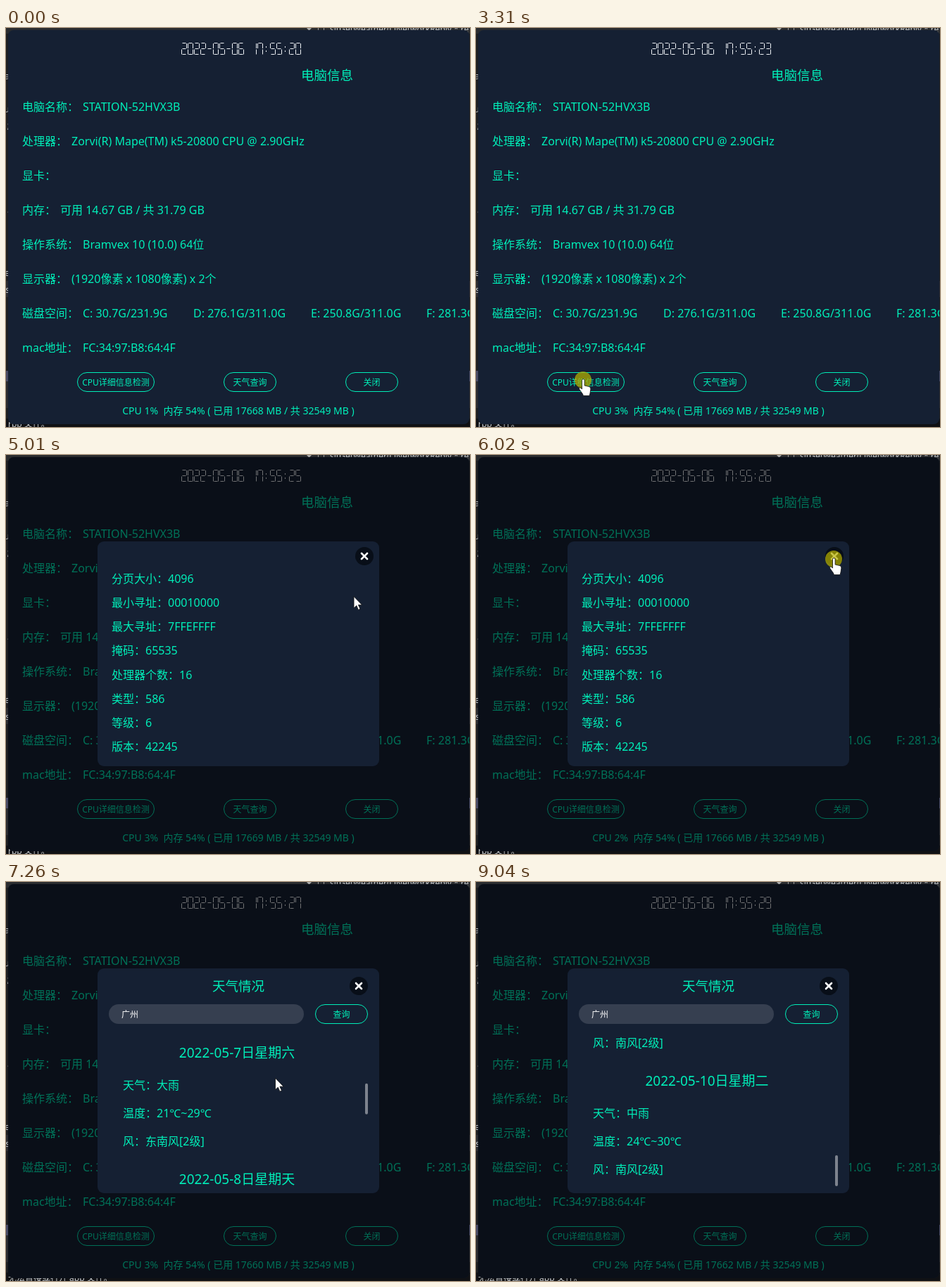
An HTML page that plays this animation: 659x568 px, repeating every 9420 ms.

```html
<!DOCTYPE html>
<html lang="zh-CN">
<head>
<meta charset="utf-8">
<title>电脑信息</title>
<style>
html, body { margin: 0; width: 659px; height: 568px; overflow: hidden; background: #1e1f21; }
svg { display: block; }
text { font-family: "Noto Sans", "Noto Sans CJK SC", "Noto Sans CJK", sans-serif; font-size: 16px; fill: #00efb9; white-space: pre; }
.mid { text-anchor: middle; }
.big { font-size: 18.5px; }
.small { font-size: 12px; }
.status { font-size: 14px; }
.code { font-size: 12px; fill: #c4c8cc; }
.pill { fill: none; stroke: #00efb9; }
</style>
</head>
<body>
<svg id="stage" width="659" height="568" viewBox="0 0 659 568">
  <defs>
    <clipPath id="frame"><rect x="3" y="3" width="655" height="561" rx="8"/></clipPath>
    <clipPath id="view"><rect x="146" y="213" width="372" height="220"/></clipPath>
  </defs>
  <g id="desk"></g>
  <g clip-path="url(#frame)">
    <rect width="659" height="568" fill="#152033"/>
    <g id="main"></g>
    <rect id="dim" width="659" height="568" fill="#000" opacity=".53"/>
    <g id="cpu"></g>
    <g id="weather"></g>
  </g>
  <circle id="press" r="12" fill="#b5b000" opacity=".72"/>
  <path id="cursor" fill="#fff" stroke="#101010" stroke-width=".8" stroke-linejoin="round"/>
</svg>
<script>
const LOOP = 9420;
const $ = id => document.getElementById(id);

function add(parent, tag, attrs, content) {
  const el = document.createElementNS('http://www.w3.org/2000/svg', tag);
  for (const k in attrs) el.setAttribute(k, attrs[k]);
  if (content !== undefined) el.textContent = content;
  parent.appendChild(el);
  return el;
}
const label = (g, x, y, s, cls = '') => add(g, 'text', { x, y, class: cls }, s);
const box = (g, x, y, width, height, fill, rx = 0) =>
  add(g, 'rect', { x, y, width, height, fill, rx });

function pill(g, x, y, w, s) {
  add(g, 'rect', { x: x + .5, y: y + .5, width: w - 1, height: 27, rx: 13.5, class: 'pill' });
  label(g, x + w / 2, y + 18.5, s, 'mid small');
}
function closer(g, x, y) {
  add(g, 'circle', { cx: x, cy: y, r: 13, fill: '#080e18' });
  add(g, 'path', { d: `M${x - 4} ${y - 4}l8 8m0-8l-8 8`, stroke: '#fff', 'stroke-width': 2.6, 'stroke-linecap': 'round' });
}

// Desktop behind the window
const desk = $('desk');
box(desk, 0, 0, 659, 568, '#1e1f21');
box(desk, 0, 0, 659, 8, '#2a2c2f');
box(desk, 0, 360, 659, 23, '#2b2c30');
box(desk, 0, 488, 659, 15, '#484a64');
box(desk, 0, 503, 659, 38, '#2a2b2f');
box(desk, 0, 556, 659, 12, '#101114');
add(desk, 'path', { d: 'M427 0h7l-3.5 4z', fill: '#aaa' });
add(desk, 'rect', { x: 443.5, y: -4.5, width: 8, height: 9, fill: 'none', stroke: '#999' });
label(desk, 460, 6, 'sitGetWeather(QNetworkReply * re', 'code');
[[73, 'a'], [120, 'u'], [143, ';'], [263, '.'], [330, 'i'], [353, 'e'], [377, 's']]
  .forEach(([y, s]) => add(desk, 'text', { x: 5, y, class: 'code', 'text-anchor': 'end' }, s));
const note = label(desk, 3, 568, '', 'code');

// Main panel
const main = $('main');
const clock = add(main, 'path', { fill: 'none', stroke: '#eef2f6', 'stroke-width': 1 });
label(main, 456, 74, '电脑信息', 'mid big');
[
  ['电脑名称：', [109, 'STATION-52HVX3B']],
  ['处理器：', [93, 'Zorvi(R) Mape(TM) k5-20800 CPU @ 2.90GHz']],
  ['显卡：'],
  ['内存：', [77, '可用 14.67 GB / 共 31.79 GB']],
  ['操作系统：', [109, 'Bramvex 10 (10.0) 64位']],
  ['显示器：', [93, '(1920像素 x 1080像素) x 2个']],
  ['磁盘空间：', [109, 'C: 30.7G/231.9G'], [266, 'D: 276.1G/311.0G'], [433, 'E: 250.8G/311.0G'], [597, 'F: 281.3G/311.0G']],
  ['mac地址：', [109, 'FC:34:97:B8:64:4F']]
].forEach(([name, ...values], i) => {
  const y = 118 + 49 * i;
  label(main, 23, y, name);
  values.forEach(([x, s]) => label(main, x, y, s));
});
pill(main, 101, 490, 110, 'CPU详细信息检测');
pill(main, 309, 490, 75, '天气查询');
pill(main, 482, 490, 75, '关闭');
const status = label(main, 330, 550, '', 'mid status');

// CPU details
const cpu = $('cpu');
box(cpu, 130, 123, 400, 320, '#152033', 9);
closer(cpu, 509, 144);
['分页大小：4096', '最小寻址：00010000', '最大寻址：7FFEFFFF', '掩码：65535',
  '处理器个数：16', '类型：586', '等级：6', '版本：42245']
  .forEach((s, i) => label(cpu, 150, Math.round(182 + 34.15 * i), s));

// Weather
const weather = $('weather');
box(weather, 130, 123, 400, 320, '#152033', 9);
label(weather, 330, 155, '天气情况', 'mid big');
closer(weather, 501, 148);
box(weather, 146, 174, 277, 28, '#363f50', 14);
label(weather, 164, 192.5, '广州', 'small').style.fill = '#fff';
pill(weather, 439, 174, 75, '查询');
const list = add(add(weather, 'g', { 'clip-path': 'url(#view)' }), 'g', {});
[
  ['四', '多云', 18, 27, '东风'], ['五', '阵雨', 20, 28, '东南风'], ['六', '大雨', 21, 29, '东南风'],
  ['天', '大雨', 22, 28, '东南风'], ['一', '中雨', 23, 29, '南风'], ['二', '中雨', 24, 30, '南风']
].forEach(([day, sky, low, high, wind], i) => {
  const y = 213 + 180 * i;
  label(list, 328, y + 37, `2022-05-${i + 5}日星期${day}`, 'mid').style.fontSize = '19px';
  [`天气：${sky}`, `温度：${low}℃~${high}℃`, `风：${wind}[2级]`]
    .forEach((s, k) => label(list, 166, y + 82 + 40 * k, s));
});
const thumb = box(weather, 510, 213, 4, 44, '#7d838e', 2);

// Seven-segment clock
const SEGMENTS = {
  a: 'M1.5 .5h5', b: 'M7.5 1v7', c: 'M7.5 9.5v7', d: 'M1.5 16.5h5',
  e: 'M.5 9.5v7', f: 'M.5 1v7', g: 'M1.5 8.5h5', p: 'M3.5 5v2m0 4v2'
};
const GLYPHS = {
  0: 'abcdef', 1: 'bc', 2: 'abdeg', 3: 'abcdg', 4: 'bcfg', 5: 'acdfg', 6: 'acdefg',
  7: 'abcf', 8: 'abcdefg', 9: 'abcdfg', '-': 'g', ':': 'p', ' ': ''
};
const led = s => [...s].map((ch, i) => [...GLYPHS[ch]].map(k =>
  SEGMENTS[k].replace(/^M(\S+) (\S+?)([hv])/, (_, x, y, c) => `M${249 + 9 * i + +x} ${21 + +y}${c}`)
    .replace(/^M3\.5 5/, `M${249 + 9 * i + 3.5} 26`)).join('')).join('');

// Timeline
const TICKS = [530, 1530, 2500, 3500, 4480, 5460, 6480, 7480, 8400];
const LOAD = [[0, 1, 17668], [530, 1, 17669], [1530, 2, 17668], [2500, 3, 17668], [2690, 3, 17669],
  [5460, 2, 17666], [6480, 3, 17660], [7480, 4, 17661], [8400, 2, 17662]];
const PATH = [[690, 612, 528], [1000, 548, 440], [1620, 512, 400], [2100, 470, 436], [2640, 397, 426],
  [3160, 152, 501], [3320, 152, 501], [3920, 353, 346], [4230, 357, 340], [4390, 357, 340],
  [5320, 533, 162], [5960, 508, 148], [6060, 508, 148], [6640, 370, 501], [6760, 370, 501],
  [7260, 383, 279], [7340, 358, 287], [8510, 358, 287], [9040, 636, 578]];
const SCROLL = [[0, 360], [7430, 360], [7640, 540], [7890, 540], [8110, 720], [8200, 720], [8410, 860]];
const CLICKS = [3300, 5960, 6650];
const CPU_OPEN = 3470, CPU_CLOSE = 6110, WEATHER_OPEN = 6860;
const BUTTONS = [[101, 490, 110, 28], [309, 490, 75, 28], [482, 490, 75, 28]];
const CPU_X = [[496, 131, 26, 26]];
const ARROW = 'M0 0V16.5L3.8 13 6.4 19 9 17.9 6.4 12H11.6Z';
const HAND = 'M-1.5.5a1.8 1.8 0 0 1 3.6 0V8l6.5 1.5q2.6.8 2.3 3.5l-.9 6-1 3.5H.5l-1-2.5-4.6-6.5q-1.2-2.2.8-2.6 1.2 0 2.8 2.2z';

function sample(keys, t) {
  const i = keys.findIndex(k => k[0] > t);
  if (i < 0) return keys[keys.length - 1].slice(1);
  if (!i) return keys[0].slice(1);
  const [a, b] = [keys[i - 1], keys[i]];
  const u = (t - a[0]) / (b[0] - a[0]);
  const e = u * (2 - u) * .5 + u * .5;
  return a.slice(1).map((v, k) => v + (b[k + 1] - v) * e);
}
const show = (el, on) => el.setAttribute('visibility', on ? 'visible' : 'hidden');
const write = (el, s) => { if (el.textContent !== s) el.textContent = s; };

function draw(t) {
  const cpuOn = t >= CPU_OPEN && t < CPU_CLOSE;
  const weatherOn = t >= WEATHER_OPEN;
  show(cpu, cpuOn);
  show(weather, weatherOn);
  show($('dim'), cpuOn || weatherOn);
  write(note, weatherOn ? '无法直接或打开 app 文件。' : 'rbb 文件。');

  clock.setAttribute('d', led('2022-05-06 17:55:' + (20 + TICKS.filter(k => k <= t).length)));
  const [, load, used] = LOAD.filter(k => k[0] <= t).pop();
  write(status, `CPU ${load}%  内存 54% ( 已用 ${used} MB / 共 32549 MB )`);

  const [top] = sample(SCROLL, t);
  list.setAttribute('transform', `translate(0 ${-top})`);
  thumb.setAttribute('y', 213 + top / 860 * 176);

  const [x, y] = sample(PATH, t);
  const hot = weatherOn ? [] : cpuOn ? CPU_X : BUTTONS;
  const over = hot.some(([bx, by, w, h]) => x >= bx && x <= bx + w && y >= by && y <= by + h);
  const cursor = $('cursor'), press = $('press');
  cursor.setAttribute('d', over ? HAND : ARROW);
  cursor.setAttribute('transform', `translate(${x} ${y})`);
  press.setAttribute('cx', x);
  press.setAttribute('cy', y);
  show(cursor, t >= 690 && t < 9030);
  show(press, CLICKS.some(k => t >= k && t < k + 140));
}

const start = performance.now();
function loop() {
  draw((performance.now() - start) % LOOP);
  requestAnimationFrame(loop);
}
loop();
</script>
</body>
</html>
```
